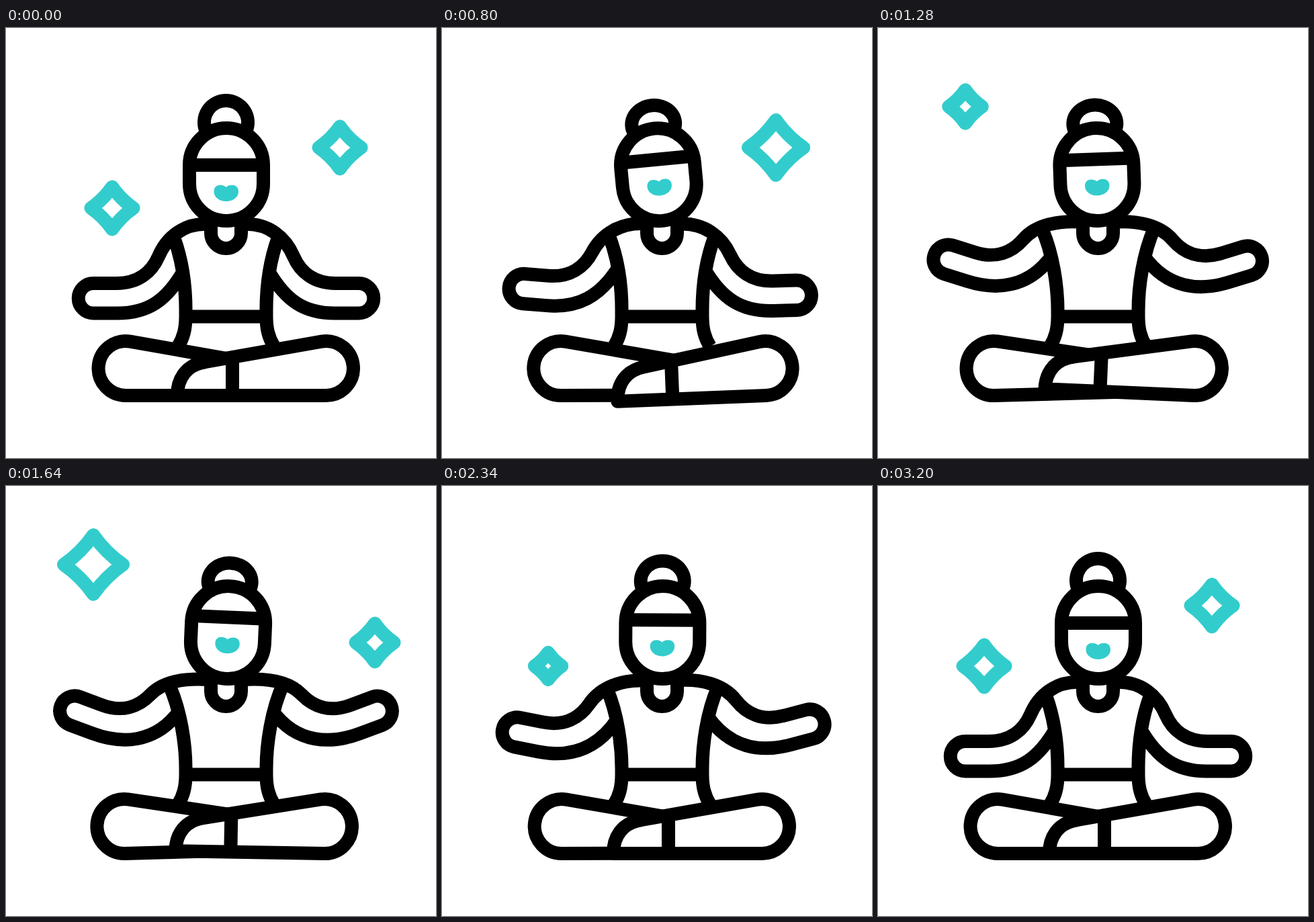
These frames come from a looping animation (640 px wide and 640 px high, 3300 ms). An HTML page:

```html
<!DOCTYPE html>
<html>
<head>
<meta charset="utf-8">
<style>
html, body { margin: 0; width: 100%; height: 100%; overflow: hidden; background: #fff; }
svg { display: block; width: 100vw; height: 100vh; }
</style>
</head>
<body>
<svg viewBox="0 0 640 640" fill="none" stroke="#000" stroke-width="20" stroke-linejoin="round">
  <g stroke="#33cccc">
    <path id="starL"/>
    <path id="starR"/>
  </g>
  <path d="M267 429.5H388"/>
  <path id="sideL"/>
  <path id="sideR" transform="translate(655 0) scale(-1 1)"/>
  <path d="M305 286V305.5a22.5 22.5 0 0 0 45 0V286"/>
  <path id="legL" d="M350 495.8L185 466.6A40.5 40.5 0 1 0 178 547H365"/>
  <g id="legR">
    <path fill="#fff" d="M469.5 466.6L297 497C270 501 255 520 255 547H476.5A40.5 40.5 0 1 0 469.5 466.6Z"/>
    <path d="M337 491V547"/>
  </g>
  <g id="head">
    <path id="bun"/>
    <path d="M273 204a55 55 0 0 1 110 0v28a55 55 0 0 1 -110 0z"/>
    <g id="face">
      <path d="M274 204H382"/>
      <path fill="#33cccc" stroke="none" d="M327.5 237C322 232 309.5 232 309.5 243.5C309.5 252 318 258 327.5 258C337.5 258 346 252 346 243.5C346 232 333 232 327.5 237Z"/>
    </g>
  </g>
</svg>
<script>
const LOOP = 3300;
const el = id => document.getElementById(id);
const move = (id, transform) => el(id).setAttribute("transform", transform);
const shape = (id, d) => el(id).setAttribute("d", d);

// Progress from 0 to 1 between times a and b: even, and eased at both ends.
const line = (t, a, b) => Math.min(1, Math.max(0, (t - a) / (b - a)));
const ramp = (t, a, b) => {
  const u = line(t, a, b);
  return u * u * (3 - 2 * u);
};

// A star swells, vanishes, blooms at its second place and returns.
function drawStar(id, t, home, away) {
  const p = 31.5 + 12.5 * line(t, 300, 490) - 44 * line(t, 490, 800)
    + 44 * line(t, 820, 1640) - 44 * line(t, 1650, 2005) + 31.5 * line(t, 2005, 2530);
  const c = p * 0.41;
  move(id, `translate(${t > 810 && t < 2005 ? away : home})`);
  shape(id, p < 10 ? "" :
    `M0 ${-p}Q${c} ${-c} ${p} 0Q${c} ${c} 0 ${p}Q${-c} ${c} ${-p} 0Q${-c} ${-c} 0 ${-p}Z`);
}

// The arm turns about the base of the neck and pulls the torso line along.
function drawSide(id, t) {
  const deg = -3 * ramp(t, 0, 580) + 19.5 * ramp(t, 580, 1100) + 4 * ramp(t, 1100, 1620)
    - 23.5 * ramp(t, 2100, 2660) + 3 * ramp(t, 2660, 3140);
  const a = deg * Math.PI / 180, k = deg / 20.5;
  const cos = Math.cos(a), sin = Math.sin(a);
  const r = (x, y) => {
    const dx = x - 303, dy = y - 292;
    return `${303 + dx * cos - dy * sin} ${292 + dx * sin + dy * cos} `;
  };
  shape(id, `M302 ${292 - 4 * k}C${264 + 8 * k} ${290 - 4 * k} ${r(239, 312)}${r(227, 340)}` +
    `C${r(217, 363)}${r(197, 380)}${r(165, 380)}L${r(130, 380)}` +
    `A22.25 22.25 0 0 0 ${r(130, 424.5)}L${r(166, 424.5)}` +
    `C${r(212, 424.5)}${239 - 17 * k} ${405 - 21 * k} ${264 - 6 * k} ${362 - 27 * k}` +
    `M${250 - 8 * k} ${312 - 18 * k}C${262 - 2 * k} ${345 - 12 * k} 268 385 267.5 425` +
    `C268 448 264 461 256 474`);
}

function drawHead(t) {
  const tilt = -5.4 * ramp(t, 0, 780) + 9.6 * ramp(t, 830, 1950)
    - 6.5 * ramp(t, 1950, 2640) + 2.3 * ramp(t, 2640, 3200);
  const up = ramp(t, 100, 750) - ramp(t, 2080, 2620);
  move("head", `rotate(${tilt} 327.5 278)`);
  move("face", `translate(0 ${-8.7 * up})`);
  shape("bun", `M297.5 153A32.5 ${32.5 - 4.7 * up} 0 1 1 357.5 153`);
}

function drawLegs(t) {
  const left = 1.6 * (ramp(t, 1600, 2500) - ramp(t, 700, 1200));
  const shift = -6 * ramp(t, 600, 1280) + 8 * ramp(t, 1280, 2020) - 2 * ramp(t, 2020, 2400);
  const right = -4.3 * ramp(t, 150, 600) + 6.8 * ramp(t, 600, 1160) - 2.5 * ramp(t, 1300, 1900);
  move("legL", `translate(${shift} 0) rotate(${left} 178 506.5)`);
  move("legR", `translate(${-2 * right} 0) rotate(${right} 476.5 506.5)`);
}

function draw(t) {
  drawHead(t);
  drawLegs(t);
  // The right side follows the left a little later.
  drawSide("sideL", t);
  drawSide("sideR", t - 60);
  drawStar("starL", t, [158, 268], [130, 117]);
  drawStar("starR", t - 290, [497, 178], [549, 233]);
}

const start = performance.now();
function frame() {
  draw((performance.now() - start) % LOOP);
  requestAnimationFrame(frame);
}
frame();
</script>
</body>
</html>
```
